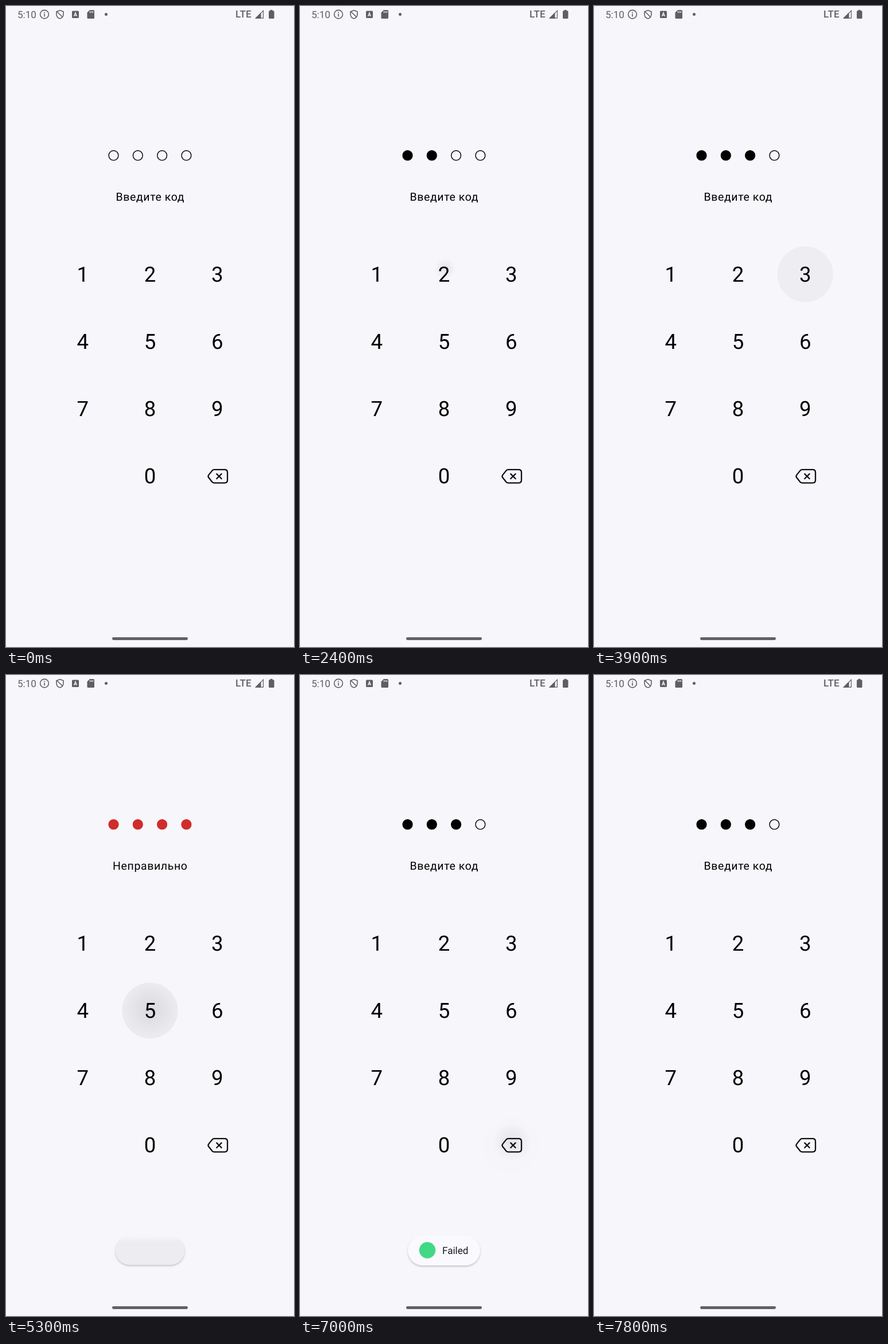
An HTML page that plays this animation: 502x1116 px, repeating every 8000 ms.

```html
<!DOCTYPE html>
<html lang="ru">
<head>
<meta charset="utf-8">
<title>Ввод кода</title>
<style>
  html, body { margin: 0; width: 100%; height: 100%; overflow: hidden; background: #f7f6fb; }
  svg { display: block; width: 100%; height: 100%; font-family: Roboto, sans-serif; text-rendering: geometricPrecision; }
  .mid { text-anchor: middle; letter-spacing: .61px; }
  #keys { font-size: 36.6px; }
  #label { font-size: 19.5px; }
  .small { font-size: 17.1px; }
  #toast { filter: drop-shadow(0 2px 1.5px rgba(0, 0, 0, .2)); transform-origin: 251px 1002px; }
</style>
</head>
<body>
<svg viewBox="0 0 502 1116">
  <defs>
    <radialGradient id="glow">
      <stop offset=".2"/>
      <stop offset="1" stop-opacity="0"/>
    </radialGradient>
    <linearGradient id="shade" x2="0" y2="1">
      <stop offset="0" stop-color="#f7f6fb"/>
      <stop offset=".2" stop-color="#ededf1"/>
    </linearGradient>
    <clipPath id="clip"><circle id="edge" r="48.8"/></clipPath>
  </defs>

  <!-- status bar -->
  <g fill="#5f5e63">
    <text class="small" x="20" y="20.7">5:10</text>
    <text class="small" x="400" y="20.4" font-weight="500">LTE</text>
    <g fill="none" stroke="#5f5e63" stroke-width="1.6">
      <circle cx="67" cy="14.5" r="7.4"/>
      <path d="M67 13.3V18.6M67 10.2V12"/>
      <path d="M94 7.5L100 9.8V14.2C100 18 97.5 20.9 94 22C90.5 20.9 88 18 88 14.2V9.8ZM88.5 9.5L98.8 19.5"/>
    </g>
    <rect x="115" y="8.5" width="12" height="12.5" rx="1.5"/>
    <path d="M118.5 18L121 11.5L123.5 18M119.4 16H122.6" fill="none" stroke="#f7f6fb" stroke-width="1.3"/>
    <path d="M146 7H152.5Q154 7 154 8.5V20.5Q154 22 152.5 22H143Q141.5 22 141.5 20.5V11.5Z"/>
    <path d="M146.500 9V12M149 9V12M151.5 9V12" stroke="#f7f6fb" stroke-width="1.2"/>
    <circle cx="174.5" cy="14.5" r="2.5"/>
    <path d="M434 21.7L444.5 11.2V21.7Z"/>
    <path d="M435.5 21.1L448.4 8.2V21.1Z" fill="none" stroke="#5f5e63" stroke-width="1.2"/>
    <path d="M460.5 8.2V6.7H464.5V8.2H466Q467.5 8.2 467.5 9.7V20.5Q467.5 22 466 22H459.5Q458 22 458 20.5V9.7Q458 8.2 459.5 8.2Z"/>
  </g>

  <g id="dots" stroke-width="1.4"></g>
  <text id="label" class="mid" x="251.3" y="339.3"></text>

  <g clip-path="url(#clip)">
    <circle id="disc" r="48.8"/>
    <circle id="spot" fill="url(#glow)"/>
  </g>
  <g id="keys"></g>
  <g fill="none" stroke="#111" stroke-width="2.3" stroke-linejoin="round" stroke-linecap="round">
    <path d="M363 807.2H381Q386 807.2 386 812V825.6Q386 830.4 381 830.4H363Q361 830.4 359.6 829L353.2 821Q351.6 818.8 353.2 816.6L359.6 808.6Q361 807.2 363 807.2Z"/>
    <path d="M367.2 814.6L375.6 823M375.6 814.6L367.2 823"/>
  </g>

  <g id="toast">
    <rect x="188" y="976" width="126" height="52" rx="26" fill="url(#shade)"/>
    <g id="face">
      <rect x="188" y="976" width="126" height="52" rx="26" fill="#f9f9fe"/>
      <circle cx="222" cy="1001.5" r="14.2" fill="#43d885"/>
      <text class="small" x="248" y="1008" fill="#1b1b1f">Failed</text>
    </g>
  </g>

  <rect x="185" y="1099.1" width="132" height="4.9" rx="2.4" fill="#626166"/>
</svg>
<script>
const LOOP = 8000, STEP = 100, RADIUS = 48.8, ERASE = 11;
const $ = id => document.getElementById(id);
const clamp = x => Math.max(0, Math.min(1, x));
const keyX = k => 251 + (k % 3 - 1) * 117.2;
const keyY = k => 467 + Math.floor(k / 3) * 117.2;
const set = (el, attrs) => { for (const k in attrs) el.setAttribute(k, attrs[k]); };

// each tap: key index, touch and release times, opacity left after release
const taps = [
  { key: 0, down: 960, up: 1700, rest: .012 },
  { key: 1, down: 2385, up: 3000, rest: .02 },
  { key: 2, down: 3350, up: 3400, rest: .035 },
  { key: 4, down: 5215, up: 5900, rest: .016 },
  { key: ERASE, down: 6950, up: 7700, rest: 0 }
];

$('keys').innerHTML = [...'123456789 0'].map((d, k) =>
  `<text class="mid" x="${keyX(k) + .3}" y="${keyY(k) + 12.7}">${d.trim()}</text>`).join('');
$('dots').innerHTML = [0, 1, 2, 3].map(i =>
  `<circle cx="${187.5 + i * 42.3}" cy="260.2" r="8.4"/>`).join('');

function drawCode(done) {
  const n = done.reduce((sum, tap) => sum + (tap.key === ERASE ? -1 : 1), 0);
  const wrong = n === 4, ink = wrong ? '#d02c2c' : '#000';
  [...$('dots').children].forEach((d, i) => set(d, { fill: i < n ? ink : 'none', stroke: ink }));
  $('label').textContent = wrong ? 'Неправильно' : 'Введите код';
}

// a glow spreads from the fingertip to the rim, then the whole disc is tinted
function drawRipple(t, tap) {
  const { key, down, up, rest } = tap || { key: 0, down: 0, up: 0, rest: 0 };
  const grow = clamp((t - down) / 100), held = t < up;
  const cx = keyX(key), cy = keyY(key);
  set($('edge'), { cx, cy });
  set($('disc'), { cx, cy, opacity: held ? .09 * grow ** 4 : rest });
  set($('spot'), {
    cx: cx + 2 * (1 - grow), cy: cy - 12 * (1 - grow),
    r: RADIUS * Math.sqrt(grow), opacity: held && grow < 1 ? .06 : 0
  });
}

function drawToast(t) {
  const show = clamp((t - 5300) / 300), hide = clamp((t - 7500) / 250);
  const style = $('toast').style;
  style.opacity = t < 5300 ? 0 : 1 - hide;
  style.transform = `scale(${.96 + .04 * Math.min(show, 1 - hide)})`;
  $('face').style.opacity = show;
}

function frame(now) {
  const t = Math.floor(now % LOOP / STEP) * STEP;
  const done = taps.filter(tap => tap.down <= t);
  drawCode(done);
  drawRipple(t, done[done.length - 1]);
  drawToast(t);
  requestAnimationFrame(frame);
}
frame(0);
</script>
</body>
</html>
```
